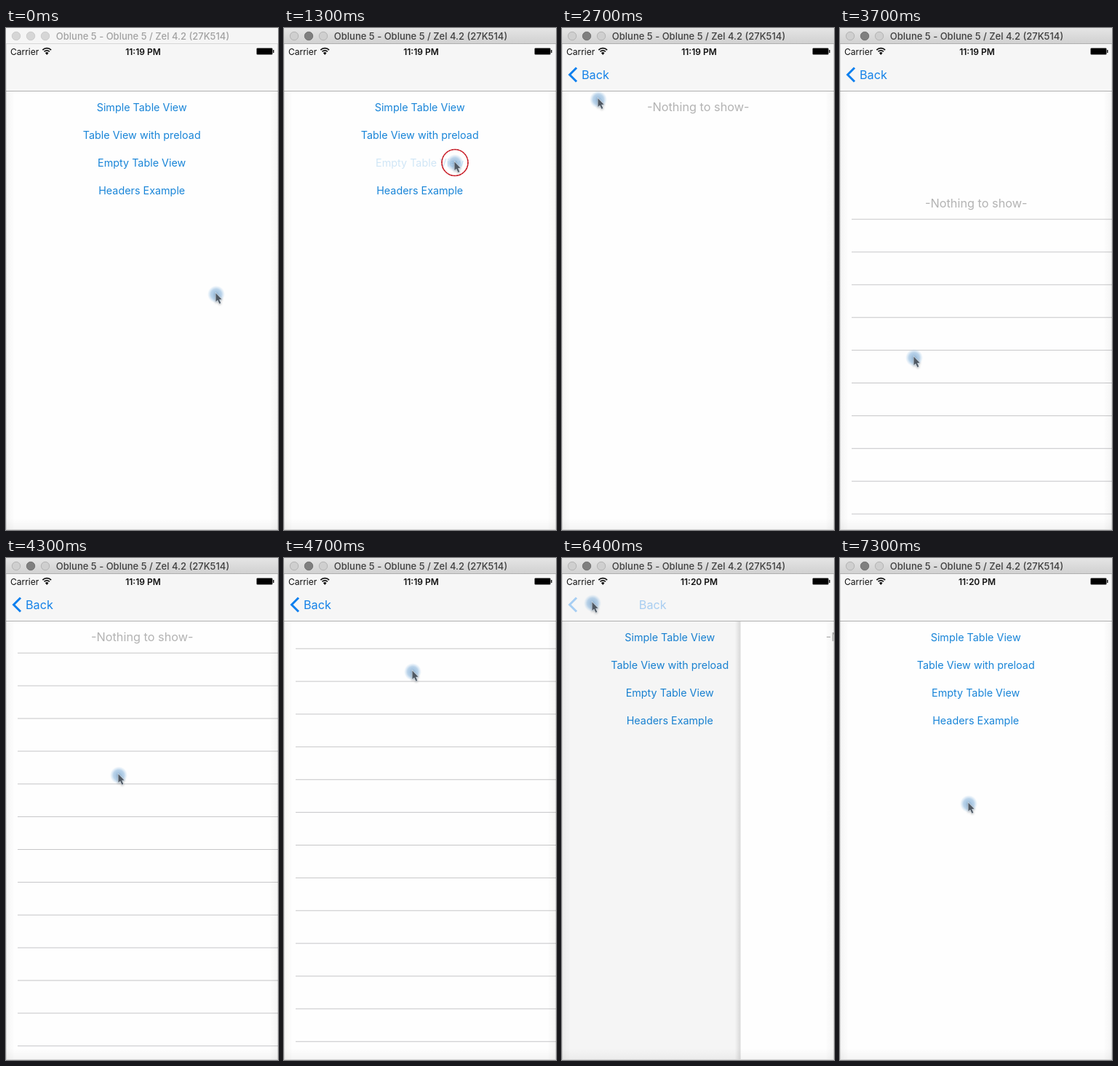
An HTML page with a canvas that plays this animation: 374x688 px, repeating every 7.4 s.

```html
<!DOCTYPE html>
<html lang="en">
<head>
<meta charset="utf-8">
<title>Table view demo</title>
<style>
  html, body { margin: 0; width: 100%; height: 100%; overflow: hidden; background: #fff; }
  canvas { display: block; }
</style>
</head>
<body>
<canvas id="stage" width="374" height="688"></canvas>
<script>
const W = 374, H = 688, LOOP = 7400, STEP = 100, NAV_BOTTOM = 86;
const ROW = 45 * W / 375;
const ctx = document.getElementById('stage').getContext('2d');
const LINKS = ['Simple Table View', 'Table View with preload', 'Empty Table View', 'Headers Example'];

// time, x, y of the pointer
const PATH = [
  [200, 289, 365], [800, 235, 185], [1700, 235, 185], [2000, 229, 201],
  [2600, 50, 98], [2800, 50, 98], [3000, 55, 145], [3600, 101, 446],
  [3700, 102, 452], [4000, 125, 420], [4400, 165, 257], [4700, 177, 156],
  [4900, 176, 76], [5100, 165, 98], [5400, 153, 123], [6000, 42, 62],
  [6500, 42, 62], [7200, 177, 337], [7400, 177, 337]
];

const clamp = v => Math.max(0, Math.min(1, v));
const smooth = u => u * u * (3 - 2 * u);
const easeOut = u => 1 - (1 - u) ** 3;
const progress = (t, start, length) => clamp((t - start) / length);

function pointer(t) {
  const i = PATH.findIndex(k => k[0] > t);
  if (i < 0) return PATH[PATH.length - 1].slice(1);
  if (i === 0) return PATH[0].slice(1);
  const [t0, x0, y0] = PATH[i - 1], [t1, x1, y1] = PATH[i];
  const u = (t - t0) / (t1 - t0), e = t < 2800 || t > 5400 ? smooth(u) : u;
  return [x0 + (x1 - x0) * e, y0 + (y1 - y0) * e];
}

// Resistance of a list pulled past its end
function rubber(pull) {
  const size = 603;
  return Math.sign(pull) * size * (1 - 1 / (1 + Math.abs(pull) * 0.55 / size));
}

function scrollOffset(t) {
  const drag = (start, end, settle) => {
    const from = pointer(start)[1];
    const off = rubber(pointer(Math.min(t, end))[1] - from);
    return off * (1 - easeOut(progress(t, end, settle)));
  };
  if (t >= 3000 && t < 4400) return drag(3000, 3700, 500);
  if (t >= 4400 && t < 5300) return drag(4400, 4900, 300);
  return 0;
}

function text(str, x, y, size, color, align = 'left', weight = 400) {
  ctx.font = `${weight} ${size}px Inter, sans-serif`;
  ctx.textAlign = align;
  ctx.fillStyle = color;
  ctx.fillText(str, x, y);
}

function rect(x, y, w, h, color) {
  ctx.fillStyle = color;
  ctx.fillRect(x, y, w, h);
}

function disc(x, y, r, fill, stroke) {
  ctx.beginPath();
  ctx.arc(x, y, r, 0, 7);
  ctx.fillStyle = fill;
  ctx.fill();
  if (stroke) {
    ctx.strokeStyle = stroke;
    ctx.lineWidth = 1;
    ctx.stroke();
  }
}

function fade(x0, y0, x1, y1, from, to) {
  const g = ctx.createLinearGradient(x0, y0, x1, y1);
  g.addColorStop(0, from);
  g.addColorStop(1, to);
  return g;
}

function menu(t) {
  rect(0, 87, W, H - 87, '#fefefe');
  LINKS.forEach((label, i) => {
    const pressed = i === 2 && t >= 1300 && t < 1500;
    ctx.globalAlpha = pressed ? 0.2 : 1;
    text(label, 186.7, 114 + 38 * i, 14.35, '#1985d8', 'center');
    ctx.globalAlpha = 1;
  });
}

function table(t) {
  rect(0, 87, W, H - 87, '#fefefe');
  const off = scrollOffset(t);
  text('-Nothing to show-', 187.3, 113.7 + off, 16.3, '#b3b3b3', 'center');
  if (t < 3000 || t >= 5400) return;
  for (let y = 129.7 + off; y < H; y += ROW) rect(16, y, W - 16, 1, '#c6c6c8');
}

function pages(t, p) {
  ctx.save();
  ctx.beginPath();
  ctx.rect(0, NAV_BOTTOM, W, H - NAV_BOTTOM);
  ctx.clip();
  if (p < 1) {
    ctx.save();
    ctx.translate(-W * 0.3 * p, 0);
    menu(t);
    ctx.restore();
    if (p > 0) rect(0, NAV_BOTTOM, W, H, `rgba(0,0,0,${0.1 * p})`);
  }
  if (p > 0) {
    const x = W * (1 - p);
    if (p < 1) rect(x - 8, NAV_BOTTOM, 8, H, fade(x - 8, 0, x, 0, 'rgba(0,0,0,0)', 'rgba(0,0,0,.12)'));
    ctx.translate(x, 0);
    table(t);
  }
  ctx.restore();

  const clear = 'rgba(0,0,0,0)', shade = 'rgba(0,0,0,.04)';
  rect(0, 87, 12, H, fade(0, 0, 12, 0, shade, clear));
  rect(W - 12, 87, 12, H, fade(W, 0, W - 12, 0, shade, clear));
  rect(0, H - 16, W, 16, fade(0, H, 0, H - 16, shade, clear));
}

function titleBar(active) {
  rect(0, 0, W, 22, active ? fade(0, 0, 0, 22, '#e5e5e5', '#d0d0d0') : '#f5f5f5');
  rect(0, 21, W, 1, active ? '#b0b0b0' : '#d6d6d6');
  [14, 34, 54].forEach((x, i) => {
    if (active && i === 1) disc(x, 11, 5.7, '#7f7f7f', '#727272');
    else disc(x, 11, 5.7, active ? '#cfcfcf' : '#d6d6d6', active ? '#b4b4b4' : '#cbcbcb');
  });
  text('Oblune 5 - Oblune 5 / Zel 4.2 (27K514)', 188, 16, 13, active ? '#3f3f3f' : '#a2a2a2', 'center', 450);
}

function statusBar(t) {
  text('Carrier', 6, 36.5, 12, '#111');
  text(t < 5800 ? '11:19 PM' : '11:20 PM', 188.5, 36.5, 12, '#111', 'center', 600);

  ctx.strokeStyle = '#111';
  ctx.lineWidth = 1.7;
  for (const r of [8.3, 5.2]) {
    ctx.beginPath();
    ctx.arc(56.2, 36, r, -Math.PI * 0.75, -Math.PI * 0.25);
    ctx.stroke();
  }
  ctx.beginPath();
  ctx.moveTo(56.2, 37);
  ctx.arc(56.2, 36.5, 3.2, -Math.PI * 0.75, -Math.PI * 0.25);
  ctx.fillStyle = '#111';
  ctx.fill();

  ctx.beginPath();
  ctx.roundRect(344.5, 27.5, 22, 9, 1.5);
  ctx.lineWidth = 1;
  ctx.strokeStyle = '#8a8a8a';
  ctx.stroke();
  rect(345, 28, 21, 8, '#000');
  rect(367, 30, 1.5, 4, '#222');
}

function navBar(t, p) {
  rect(0, 22, W, 64, '#f6f6f6');
  rect(0, NAV_BOTTOM, W, 1, '#b0b0b0');
  statusBar(t);
  if (p <= 0) return;
  ctx.globalAlpha = p * (t >= 6200 && t < 6400 ? 0.3 : 1);
  ctx.beginPath();
  ctx.moveTo(20, 54.5);
  ctx.lineTo(10.5, 64);
  ctx.lineTo(20, 73.5);
  ctx.strokeStyle = '#0f80ee';
  ctx.lineWidth = 3;
  ctx.stroke();
  text('Back', 27 + 120 * (1 - p), 69.7, 16.2, '#1482e8');
  ctx.globalAlpha = 1;
}

function cursor(t) {
  const [x, y] = pointer(t);
  const glow = ctx.createRadialGradient(x, y, 0, x, y, 12);
  glow.addColorStop(0, 'rgba(110,160,205,.72)');
  glow.addColorStop(0.6, 'rgba(140,182,220,.6)');
  glow.addColorStop(1, 'rgba(165,203,235,0)');
  disc(x, y, 12, glow);

  const clicking = (t >= 1300 && t < 1500) || (t >= 6200 && t < 6400);
  if (clicking) {
    ctx.beginPath();
    ctx.arc(x, y - 0.5, 18, 0, 7);
    ctx.strokeStyle = '#df2b35';
    ctx.lineWidth = 1.6;
    ctx.stroke();
    ctx.setLineDash([1.5, 2.5]);
    ctx.strokeStyle = '#7d1920';
    ctx.lineWidth = 1;
    ctx.stroke();
    ctx.setLineDash([]);
  }

  ctx.save();
  ctx.translate(x - 0.5, y - 1.5);
  ctx.beginPath();
  for (const [px, py] of [[0, 0], [0, 11.5], [2.6, 9.2], [4.9, 14.3], [6.8, 13.4], [4.6, 8.5], [8, 8.2]]) ctx.lineTo(px, py);
  ctx.closePath();
  ctx.shadowColor = 'rgba(0,0,0,.35)';
  ctx.shadowBlur = 3;
  ctx.shadowOffsetY = 1;
  ctx.strokeStyle = 'rgba(215,224,234,.75)';
  ctx.lineWidth = 1.6;
  ctx.stroke();
  ctx.shadowColor = 'transparent';
  ctx.fillStyle = '#505963';
  ctx.fill();
  ctx.restore();
}

function draw(t) {
  const p = easeOut(progress(t, 1350, 500)) - easeOut(progress(t, 6250, 500));
  rect(0, 0, W, H, '#fefefe');
  pages(t, p);
  navBar(t, p);
  titleBar(t >= 300);
  rect(0, 22, 1, H, 'rgba(0,0,0,.1)');
  rect(W - 1, 22, 1, H, 'rgba(0,0,0,.1)');
  rect(0, H - 1, W, 1, '#d2d2d2');
  cursor(t);
}

const begin = performance.now();
function tick() {
  const t = (performance.now() - begin) % LOOP;
  draw(Math.floor(t / STEP) * STEP);
  requestAnimationFrame(tick);
}
tick();
</script>
</body>
</html>
```
